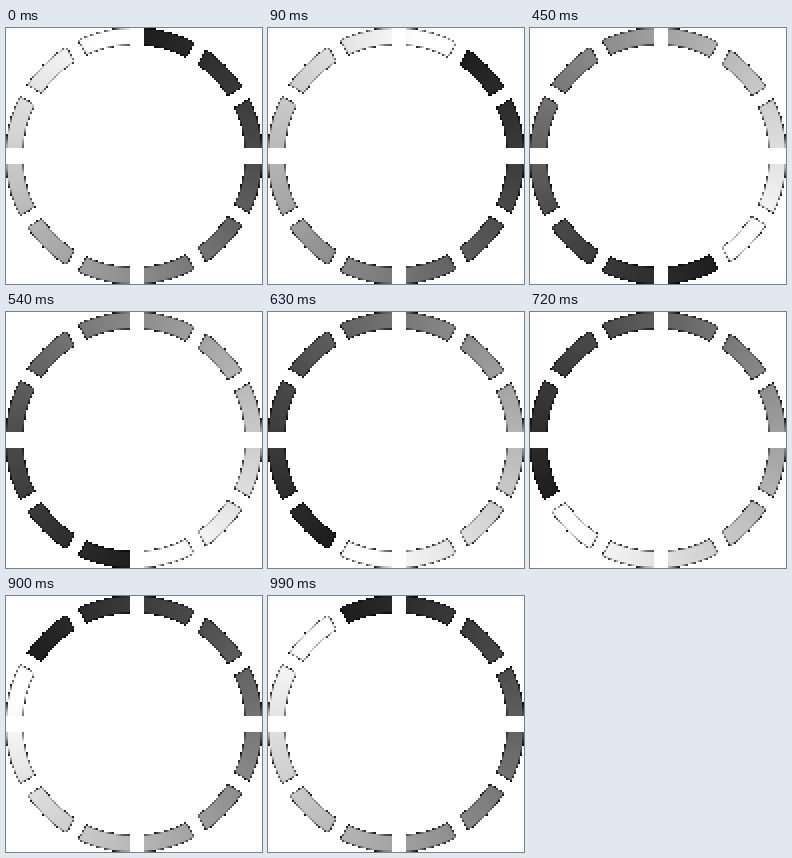
An HTML page with a canvas for the animation above (1.08 s loop, 256 px wide and 256 px high).

```html
<!DOCTYPE html>
<html>
<head>
<meta charset="utf-8">
<style>
html, body { margin: 0; height: 100%; overflow: hidden; background: #fff; }
canvas { display: block; width: 256px; height: 256px; image-rendering: pixelated; }
</style>
</head>
<body>
<canvas id="stage" width="128" height="128"></canvas>
<script>
const ctx = document.getElementById('stage').getContext('2d', { willReadFrequently: true });
const SIZE = 128, MID = SIZE / 2, HUB = 65.5; // spokes meet slightly right of the middle
const INNER = 55.7, STEP = 90, COUNT = 12, TURN = Math.PI * 2 / COUNT;

function drawRing(step) {
  const shade = ctx.createConicGradient((step - COUNT / 4) * TURN, HUB, MID);
  shade.addColorStop(0, 'rgb(28,28,28)');
  shade.addColorStop(0.25, 'rgb(75,75,75)');
  shade.addColorStop(0.95, 'rgb(255,255,255)');
  ctx.strokeStyle = shade;
  ctx.lineWidth = MID - INNER;
  ctx.beginPath();
  ctx.arc(MID, MID, (MID + INNER) / 2, 0, Math.PI * 2);
  ctx.stroke();
}

function cutSpokes() {
  ctx.globalCompositeOperation = 'destination-out';
  for (let i = 0; i < COUNT; i++) {
    const gap = i % 6 === 3 ? 8 : 7;
    ctx.save();
    ctx.translate(HUB, MID);
    ctx.rotate(i * TURN);
    ctx.fillRect(-gap / 2, -SIZE, gap, SIZE);
    ctx.restore();
  }
  ctx.globalCompositeOperation = 'source-over';
}

// Hard edges: partly covered pixels turn dark, nearly empty ones vanish
function hardenEdges() {
  const image = ctx.getImageData(0, 0, SIZE, SIZE), px = image.data;
  for (let i = 0; i < px.length; i += 4) {
    const cover = px[i + 3] / 255;
    px[i] = px[i + 1] = px[i + 2] = px[i] * cover;
    px[i + 3] = cover > 0.1 ? 255 : 0;
  }
  ctx.putImageData(image, 0, 0);
}

const start = performance.now();
let shown = -1;
function tick() {
  const step = Math.floor((performance.now() - start) / STEP) % COUNT;
  if (step !== shown) {
    shown = step;
    ctx.clearRect(0, 0, SIZE, SIZE);
    drawRing(step);
    cutSpokes();
    hardenEdges();
  }
  requestAnimationFrame(tick);
}
tick();
</script>
</body>
</html>
```
